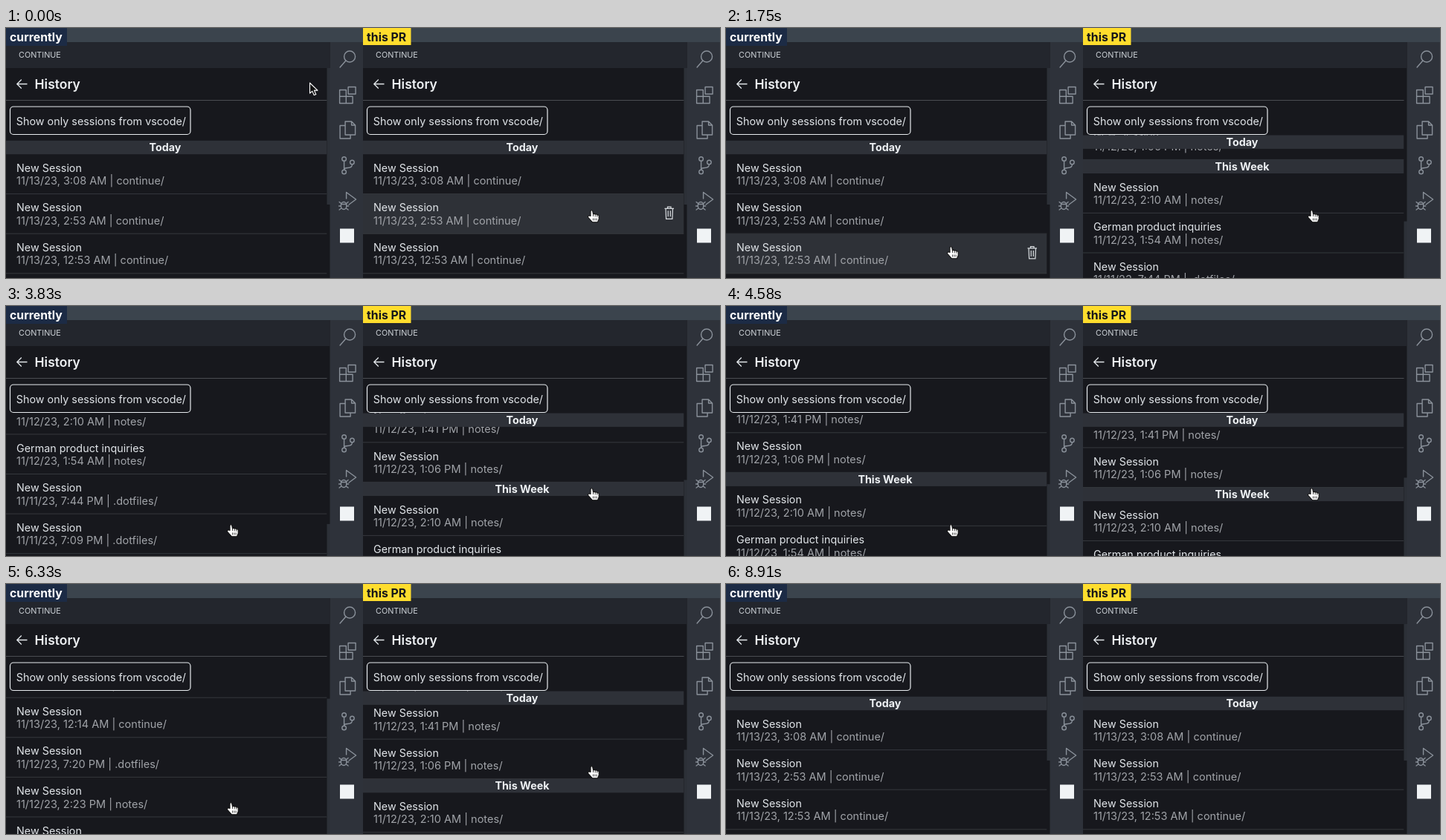
These frames come from a looping animation (960 by 337 pixels, 9070 ms). An HTML page:

```html
<!DOCTYPE html>
<html lang="en">
<head>
<meta charset="utf-8">
<title>Session history</title>
<style>
html, body { margin: 0; width: 100%; height: 100%; overflow: hidden; background: #17181d; }
svg { display: block; width: 960px; height: 337px; font-family: Inter, "Open Sans", sans-serif; }
.name { font-size: 14.35px; fill: #e1e5e9; }
.date { font-size: 14.53px; fill: #a0a3a8; }
.head { font-size: 14.3px; font-weight: 700; fill: #eef1f4; text-anchor: middle; }
.icon { fill: none; stroke: #8a919a; stroke-width: 1.4; stroke-linejoin: round; stroke-linecap: round; }
</style>
</head>
<body>
<svg id="stage" viewBox="0 0 960 337"></svg>
<script>
const LOOP = 9070, STEP = 1000 / 12;
const ROW = 53.6, HEAD = 18.4, LIST_TOP = 151.8, CLIP = 143, STICK = 144.5;
const THUMB = 184, THUMB_RATE = 0.435, WIDTH = 431.5;

const sessions = [
  ["11/13/23, 3:08 AM", "continue/"], ["11/13/23, 2:53 AM", "continue/"],
  ["11/13/23, 12:53 AM", "continue/"], ["11/13/23, 12:19 AM", "continue/"],
  ["11/13/23, 12:14 AM", "continue/"], ["11/12/23, 7:20 PM", ".dotfiles/"],
  ["11/12/23, 2:23 PM", "notes/"], ["11/12/23, 1:41 PM", "notes/"],
  ["11/12/23, 1:06 PM", "notes/"], ["11/12/23, 2:10 AM", "notes/"],
  ["11/12/23, 1:54 AM", "notes/", "German product inquiries"],
  ["11/11/23, 7:44 PM", ".dotfiles/"], ["11/11/23, 7:09 PM", ".dotfiles/"],
  ["11/11/23, 6:32 PM", ".dotfiles/"]
];
const WEEK_START = 9;
const rowTop = i => LIST_TOP + HEAD * (i < WEEK_START ? 1 : 2) + i * ROW;
const weekTop = LIST_TOP + HEAD + WEEK_START * ROW;

// [time, value] keys
const leftScroll = [[0, 0], [1833, 0], [2583, 160.6], [3500, 551.5], [3917, 551.5],
  [5417, 273.6], [6750, 212], [6917, 212], [7250, 0]];
const rightScroll = [[0, 0], [417, 0], [1750, 475], [2167, 540], [2583, 540],
  [3833, 415], [5417, 400], [6750, 385], [6917, 385], [7334, 349.2], [7833, 0]];
const MOVE_START = 250, MOVE_END = 1150, LEAVE = 8080;

const NS = "http://www.w3.org/2000/svg";
const stage = document.getElementById("stage");

function add(parent, tag, attrs = {}, text) {
  const node = document.createElementNS(NS, tag);
  for (const key in attrs) node.setAttribute(key, attrs[key]);
  if (text) node.textContent = text;
  parent.appendChild(node);
  return node;
}
const rect = (p, x, y, width, height, fill, more) => add(p, "rect", { x, y, width, height, fill, ...more });
const text = (p, x, y, str, more) => add(p, "text", { x, y, ...more }, str);
const place = (node, x, y) => node.setAttribute("transform", `translate(${x} ${y})`);
const show = (node, on) => node.setAttribute("visibility", on ? "visible" : "hidden");

const clip = add(add(stage, "defs"), "clipPath", { id: "list" });
add(clip, "rect", { x: 0, y: CLIP, width: WIDTH, height: 200 });

function drawIcons(parent) {
  const g = add(parent, "g", { class: "icon" });
  const path = d => add(g, "path", { d });
  const ring = (cx, cy, r) => add(g, "circle", { cx, cy, r });
  place(g, 0.6, 0);
  ring(461.5, 38.5, 7.5);
  path("M456.3 44L448.5 53");
  path("M448 83.5h8.7v8.7h8.8v9.3H448zM448 92.2h8.7v9.3M459.5 79.5h10v9.5h-10z");
  path("M455.5 131v-5h8.5l5 5v13h-13.5zM464 126v5h5M455.5 131.5h-7v17.5h14v-5");
  ring(454, 176.5, 2.8);
  ring(454, 194, 2.8);
  ring(464.8, 181, 2.8);
  path("M454 179.500v11.500M464.800 184c0 4-3 4.500-6 4.500-3 0-4.800 1-4.800 2.500");
  path("M457 230v-8.5L470 231l-9.5 7");
  add(g, "ellipse", { cx: 453.5, cy: 239.5, rx: 3.8, ry: 5 });
  path("M450 237.5h7M447.5 234.5l2.500 2M459.5 234.5l-2.5 2M447 240h2.700M457.3 240h2.700M447.5 245l2.700-2M459.5 245l-2.700-2");
  rect(parent, 449, 270.5, 19, 19, "#f0f3f5");
}

function drawRow(parent, i) {
  const [date, dir, name = "New Session"] = sessions[i];
  const g = add(parent, "g");
  place(g, 0, rowTop(i));
  const hover = add(g, "g");
  rect(hover, 0, 0, WIDTH, ROW, "#2e3137");
  add(hover, "path", {
    d: "M405.5 19.5h12.5M409.5 19.5v-2.300h4.500v2.300M407 19.5l.6 14h8.300l.6-14M410.2 22.5v8M413.3 22.5v8",
    fill: "none", stroke: "#d5d9dd", "stroke-width": 1.25
  });
  text(g, 14, 23.5, name, { class: "name" });
  text(g, 14, 41, `${date} | ${dir}`, { class: "date" });
  rect(g, 0, ROW - 0.7, WIDTH, 1, "#35383d");
  return hover;
}

function drawHead(parent, label) {
  const g = add(parent, "g");
  rect(g, 0, 0, WIDTH, HEAD, "#2e3138");
  text(g, 214, 14.5, label, { class: "head" });
  return g;
}

function panel(x, badge, badgeWidth, badgeHeight, badgeFill, badgeInk) {
  const g = add(stage, "g");
  place(g, x, 0);
  rect(g, 0, 0, 480, 337, "#17181d");

  const list = add(g, "g", { "clip-path": "url(#list)" });
  const rows = add(list, "g");
  const hovers = sessions.map((_, i) => drawRow(rows, i));
  const today = drawHead(list, "Today");
  const week = drawHead(list, "This Week");

  rect(g, 0, 97, WIDTH, 1, "#4a4d52");
  add(g, "path", { d: "M28.500 75.500H15M20.800 69.500l-6 6 6 6", fill: "none", stroke: "#e1e5e9", "stroke-width": 1.3 });
  text(g, 38.5, 82, "History", { "font-size": 17.5, "font-weight": 600, fill: "#eef1f4" });
  rect(g, 5.5, 106, 242.5, 37.5, "#17181d", { rx: 4.5, stroke: "#e8ecef", "stroke-width": 1.2 });
  text(g, 13.8, 130.5, "Show only sessions from vscode/", { class: "name" });

  const thumb = rect(g, 431.5, 54, 4.5, THUMB, "#2c3037");
  rect(g, 435.5, 19, 44.5, 318, "#2e323a");
  rect(g, 0, 19, 435.5, 35, "#23262d");
  rect(g, 0, 0, 480, 19, "#3b444d");
  text(g, 17, 40, "CONTINUE", { "font-size": 10.8, fill: "#cdd2d7" });
  drawIcons(g);
  rect(g, 0, 0, badgeWidth, badgeHeight, badgeFill);
  text(g, 5, 17.5, badge, { "font-size": 15.8, "font-weight": 700, fill: badgeInk });

  return (scroll, hoverRow) => {
    place(rows, 0, -scroll);
    hovers.forEach((h, i) => show(h, i === hoverRow));
    const top = x ? STICK : -Infinity;
    place(today, 0, Math.max(top, LIST_TOP - scroll));
    place(week, 0, Math.max(top, weekTop - scroll));
    thumb.setAttribute("y", 54 + scroll * THUMB_RATE);
  };
}

const drawLeft = panel(0, "currently", 82, 24, "#1c2b45", "#ffffff");
const drawRight = panel(480, "this PR", 64.5, 23, "#ffdd2d", "#15161a");

function cursor(d, fill, stroke) {
  const g = add(stage, "g", { stroke, "stroke-width": 1.1, "stroke-linejoin": "round" });
  add(g, "path", { d, fill });
  return g;
}
function handCursor() {
  const g = cursor("M-1.5 7.5V1.5C-1.5-.7 1-.7 1.3 1.2L2 5c1-1 2.300-.7 2.700.3 1-.8 2.300-.3 2.600.7 1.300-.5 2.400.3 2.400 1.700v3.800L8 15.800H1L-4.500 9.500c-1.500-2 .8-3.200 3-2z", "#fff", "#111");
  add(g, "path", { d: "M2 5v3M4.700 5.500v3M7.300 6.200v2.500M2 10.500v3M4.300 10.500v3M6.600 10.500v3", fill: "none", "stroke-width": 0.8 });
  return g;
}
const hand = handCursor();
const rightHand = handCursor();
const arrow = cursor("M0 0V14l3.300-2.900 2.400 5.400 2.600-1.100-2.400-5.300H10.500z", "#111", "#fff");
place(rightHand, 787.5, 246);

function at(keys, t) {
  let i = 1;
  while (i < keys.length && keys[i][0] < t) i++;
  if (i === keys.length) return keys[i - 1][1];
  const [t0, v0] = keys[i - 1], [t1, v1] = keys[i];
  return v0 + (v1 - v0) * Math.max(0, t - t0) / (t1 - t0);
}

function draw(t) {
  const present = t < LEAVE;
  const p = Math.min(1, Math.max(0, (t - MOVE_START) / (MOVE_END - MOVE_START)));
  const ease = p * p * (3 - 2 * p);
  const x = 408.5 - 106 * ease, y = 74 + 221 * ease;
  const row = Math.floor((y - rowTop(0)) / ROW);
  const pointing = row >= 0;

  drawLeft(at(leftScroll, t), present ? row : -1);
  drawRight(at(rightScroll, t), present ? 1 : -1);
  place(hand, x, y);
  place(arrow, x, y);
  show(hand, present && pointing);
  show(arrow, present && !pointing);
  show(rightHand, present);
}

const start = performance.now();
function tick() {
  const t = (performance.now() - start) % LOOP;
  draw(Math.floor((t + 8) / STEP) * STEP);
  requestAnimationFrame(tick);
}
draw(0);
tick();
</script>
</body>
</html>
```
